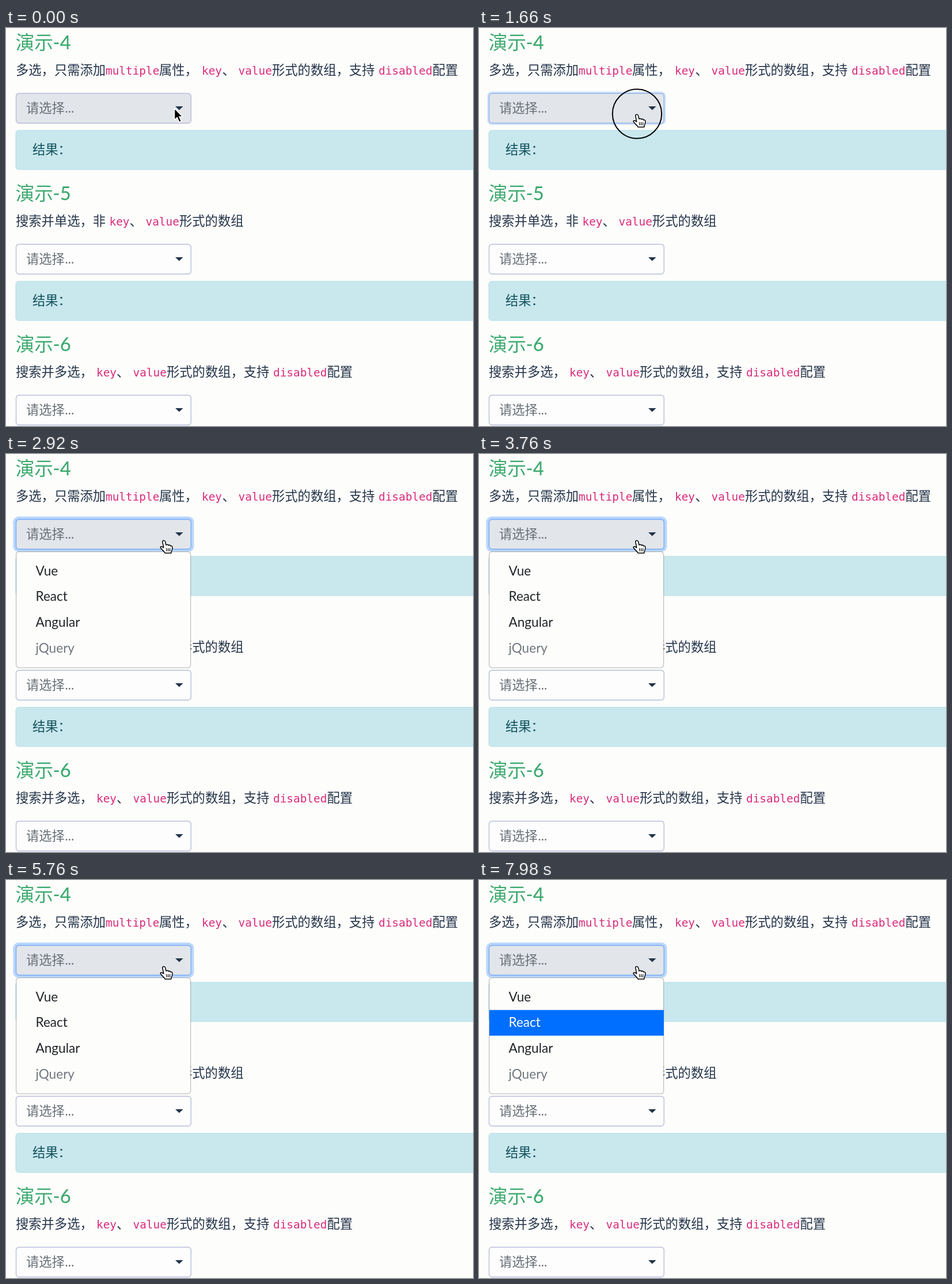
An HTML page that plays this animation: 811 by 691 pixels, repeating every 8000 ms.

```html
<!DOCTYPE html>
<html lang="zh-CN">
<head>
<meta charset="utf-8">
<style>
  html, body { margin: 0; width: 100%; height: 100%; overflow: hidden; background: #fdfdfb; }
  svg { display: block; }
  text { font: 22.3px Lato, "Noto Sans CJK SC", "Noto Sans CJK", sans-serif; fill: #24344a; white-space: pre; }
  .cjk { font-family: "Noto Sans CJK SC", "Noto Sans CJK", sans-serif; }
  .title { font-size: 32.8px; font-weight: 500; fill: #3eaa70; }
  .code { font: 19.4px "DejaVu Sans Mono", monospace; fill: #d92b7b; }
  .hint { fill: #686f77; }
  .result { fill: #10505c; }
  .alert { fill: #c9e8ed; stroke: #b0dce9; }
  .button { fill: #fdfdfd; stroke: #b8bdda; stroke-width: 1.4; }
  .item { fill: #212529; font-size: 22.6px; }
  .item.disabled { fill: #70777e; }
</style>
</head>
<body>
<svg id="stage" width="811" height="691" viewBox="0 0 811 691">
  <g id="page"></g>
  <g id="menu">
    <rect x="17.6" y="169.6" width="303" height="201.6" rx="5" fill="#fdfdfb"/>
    <rect x="17.6" y="169.6" width="303" height="201.6" rx="5" fill="none" stroke="#000" stroke-opacity=".24" stroke-width="1.3"/>
    <rect id="highlight" x="18" width="303" height="44.6" fill="#006fff"/>
    <g id="items"></g>
  </g>
  <circle id="ring" cx="274.5" cy="149" r="42.7" fill="none" stroke="#000" stroke-width="2"/>
  <g id="pointer" stroke-linejoin="round">
    <path id="arrow" d="M0 0V20L4.6 15.8L8.2 24L12 22.3L8.4 14.4H14.3Z" fill="#000" stroke="#fff" stroke-width="1.5"/>
    <g id="hand" stroke="#000" stroke-width="1.5" stroke-linecap="round">
      <path fill="#fff" d="M-3.2 3.2C-3.8 .2 .8 -.3 1.6 2.7L3 8.6C4 7.3 6.5 7.5 7 9.2C8 8 10 8.4 10.6 10.2C12 9.4 14 10.3 14 12.8C14 17.2 12 18.6 11.7 22.6H1.2C.2 19.8 -4.2 17 -6.6 13.4C-7.8 11.2 -4.8 10.1 -1.2 13.2Z"/>
      <path fill="none" stroke-width="1.2" d="M3.5 14.3L4.2 19M6.6 14.3L7 19M9.7 14.3V19"/>
    </g>
  </g>
</svg>
<script>
const LOOP = 8000;
const PRESS = 1540, RELEASE = 1700, FOCUS_TIME = 210;
const FIRST_KEY = 5960, SECOND_KEY = 6260;
const ITEM_TOP = 181, ITEM_HEIGHT = 44.7, SECTION_HEIGHT = 262;

const $ = id => document.getElementById(id);

function add(parent, tag, attributes, content = "") {
  const node = document.createElementNS("http://www.w3.org/2000/svg", tag);
  for (const name in attributes) node.setAttribute(name, attributes[name]);
  node.textContent = content;
  parent.append(node);
  return node;
}

const label = (parent, x, y, className, content) =>
  add(parent, "text", { x, y, class: className }, content);

const sections = [
  [[17, "多选，只需添加"], [173, "multiple"], [266, "属性，"], [340, "key"], [375.5, "、"],
   [403.5, "value"], [462, "形式的数组，支持"], [647, "disabled"], [740.5, "配置"]],
  [[17, "搜索并单选，非"], [179.5, "key"], [214.5, "、"], [242.5, "value"], [301, "形式的数组"]],
  [[17, "搜索并多选，"], [157, "key"], [192, "、"], [220.5, "value"],
   [279, "形式的数组，支持"], [464, "disabled"], [557.5, "配置"]]
];

const buttons = sections.map((runs, i) => {
  const group = add($("page"), "g", { transform: `translate(0 ${i * SECTION_HEIGHT})` });
  label(group, 16.5, 37, "title cjk", "演示");
  label(group, 81.5, 37, "title", "-" + (i + 4));
  for (const [x, content] of runs)
    label(group, x, 81, /^[a-z]/.test(content) ? "code" : "cjk", content);

  add(group, "rect", { x: 17, y: 177.8, width: 820, height: 68, rx: 5, class: "alert" });
  label(group, 46, 219, "result cjk", "结果：");

  const glow = add(group, "rect", { fill: "#b9d6fc" });
  const box = add(group, "rect", { x: 17.5, y: 113.5, width: 303.8, height: 51.7, rx: 5, class: "button" });
  label(group, 35, 147, "hint cjk", "请选择");
  label(group, 102.5, 147, "hint", "...");
  add(group, "path", { d: "M294 136h13.6l-6.8 6.6z", fill: "#22344a" });
  return { glow, box };
});

const items = ["Vue", "React", "Angular", "jQuery"].map((name, i) =>
  label($("items"), 51.5, 210.7 + i * ITEM_HEIGHT, name === "jQuery" ? "item disabled" : "item", name));

const clamp = v => Math.min(1, Math.max(0, v));
const smooth = v => v * v * (3 - 2 * v);
const mix = (from, to, k) => from + (to - from) * k;
const show = (node, visible) => node.setAttribute("display", visible ? "inline" : "none");

function drawFocus({ glow, box }, k) {
  const spread = 4.6 * k;
  const frame = {
    x: 17 - spread, y: 113 - spread,
    width: 304.8 + 2 * spread, height: 52.7 + 2 * spread, rx: 5.5 + spread
  };
  for (const name in frame) glow.setAttribute(name, frame[name]);
  glow.setAttribute("opacity", k);
  const border = [[184, 116], [189, 170], [218, 248]].map(([from, to]) => mix(from, to, k));
  box.style.stroke = `rgb(${border})`;
}

function draw(t) {
  drawFocus(buttons[0], smooth(clamp((t - PRESS) / FOCUS_TIME)));

  const travel = 1 - (1 - clamp((t - 20) / 600)) ** 3;
  $("pointer").setAttribute("transform", `translate(${mix(292.5, 275, travel)} ${mix(139.5, 149.5, travel)})`);
  show($("arrow"), t < 60);
  show($("hand"), t >= 60);
  show($("ring"), t >= PRESS && t < RELEASE);
  show($("menu"), t >= RELEASE);

  const active = t < FIRST_KEY ? -1 : t < SECOND_KEY ? 0 : 1;
  show($("highlight"), active >= 0);
  $("highlight").setAttribute("y", ITEM_TOP + active * ITEM_HEIGHT);
  items.forEach((item, i) => item.style.fill = i === active ? "#fff" : "");
}

buttons[0].box.style.fill = "#e2e5e9";
const start = performance.now();
function tick() {
  draw((performance.now() - start) % LOOP);
  requestAnimationFrame(tick);
}
tick();
</script>
</body>
</html>
```
